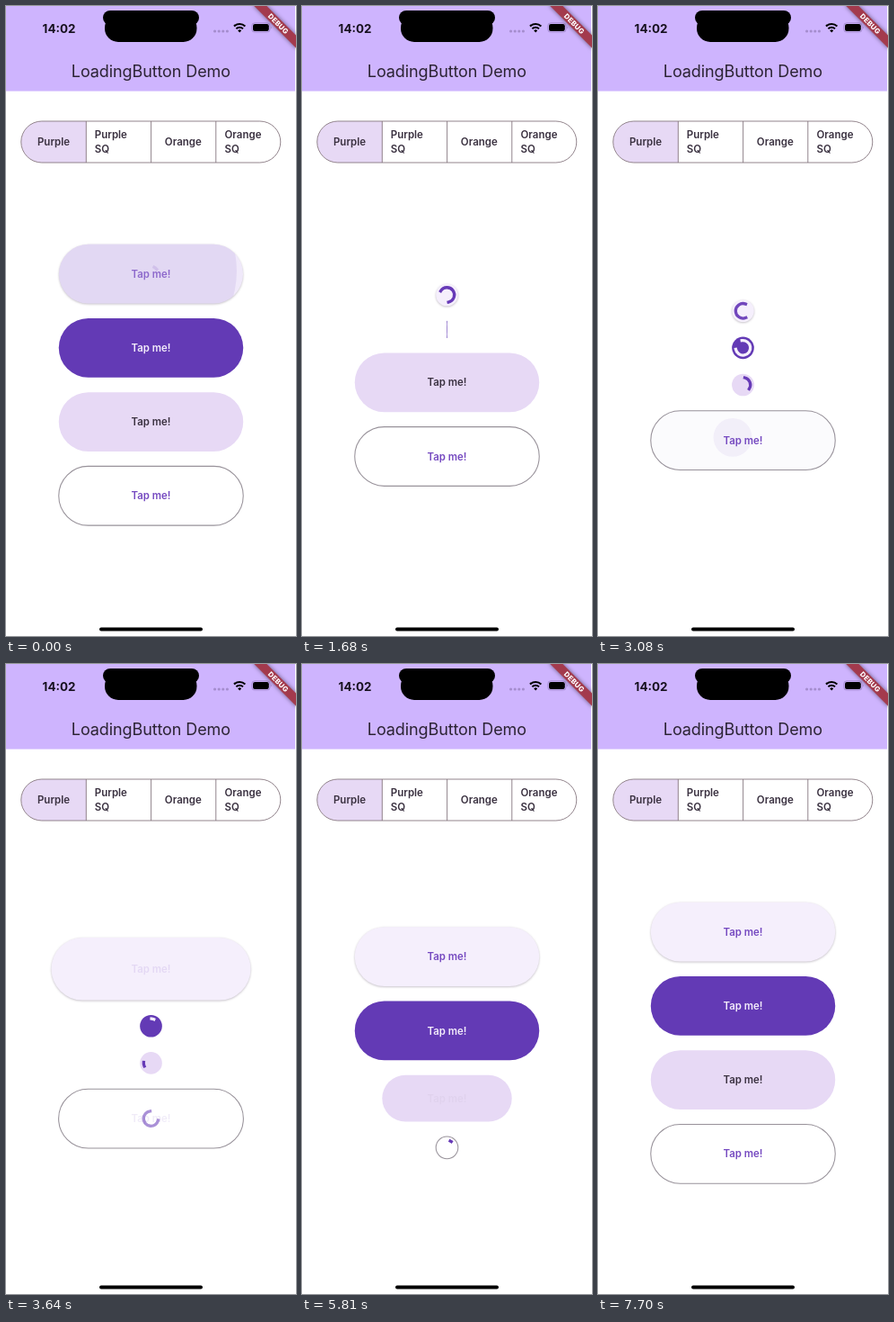
These frames come from a looping animation (323x700 px, 8000 ms). An HTML page:

```html
<!DOCTYPE html>
<html lang="en">
<head>
<meta charset="utf-8">
<title>LoadingButton Demo</title>
<style>
  html, body { margin: 0; width: 100%; height: 100%; overflow: hidden; background: #fff; }
  svg { display: block; width: 100vw; height: 100vh; font-family: Inter, Roboto, sans-serif; }
  .mid { text-anchor: middle; }
  .segments { font-size: 11.5px; font-weight: 600; fill: #3a3140; }
  .label { font-size: 13.9px; font-weight: 600; text-anchor: middle; }
  .line { fill: none; stroke: #86767f; stroke-width: .9; }
  .raised { filter: drop-shadow(0 1.5px 1px rgba(40, 20, 50, .28)); }
  .ribbon { filter: drop-shadow(0 0 2.5px rgba(0, 0, 0, .5)); }
</style>
</head>
<body>
<svg viewBox="0 0 323 700" preserveAspectRatio="none">
  <rect width="323" height="700" fill="#fff"/>
  <rect width="322" height="94.6" fill="#ceb4fe"/>
  <text class="mid" x="161.4" y="78.8" font-size="18" letter-spacing="-.1" fill="#2b2333">LoadingButton Demo</text>

  <g id="status">
    <text class="mid" x="59" y="29.5" font-size="13.4" font-weight="700" fill="#17111f">14:02</text>
    <rect x="110" y="9" width="102.5" height="31" rx="15"/>
    <rect x="108" y="5" width="107" height="16" rx="8"/>
    <g fill="#a58dce">
      <circle cx="232.6" cy="28" r="1.6"/><circle cx="237.2" cy="28" r="1.6"/>
      <circle cx="241.8" cy="28" r="1.6"/><circle cx="246.4" cy="28" r="1.6"/>
    </g>
    <g fill="none" stroke="#000" stroke-width="2">
      <path d="M254 22.5a8.8 8.8 0 0 1 12.4 0"/>
      <path d="M256.4 25.2a5.4 5.4 0 0 1 7.6 0"/>
    </g>
    <path d="M258.2 27.2a3 3 0 0 1 4 0l-2 2.2z"/>
    <rect x="273.7" y="18.8" width="20.4" height="10.4" rx="3.4" fill="none" stroke="#9f86c9" stroke-width=".8"/>
    <rect x="275" y="20" width="17.8" height="8" rx="2.3"/>
    <path d="M295 22.4q1.6 1.6 0 3.2z" fill="#9f86c9"/>
  </g>

  <g transform="translate(323 0) rotate(45)">
    <rect class="ribbon" x="-34" y="23" width="68" height="9.9" fill="#a33a4d"/>
    <text class="mid" y="30.8" font-size="7.8" font-weight="800" letter-spacing=".2" fill="#fff">DEBUG</text>
  </g>

  <g class="segments">
    <path d="M89.3 128H40a23 23 0 0 0 0 46h49.3z" fill="#e7d9f5"/>
    <rect class="line" x="16.8" y="128" width="289" height="46" rx="23"/>
    <path class="line" d="M89.3 128v46M161.6 128v46M233.8 128v46"/>
    <text class="mid" x="53" y="155.2">Purple</text>
    <text x="98.8" y="147">Purple</text><text x="98.8" y="163.4">SQ</text>
    <text class="mid" x="197.3" y="155.2">Orange</text>
    <text x="243.5" y="147">Orange</text><text x="243.5" y="163.4">SQ</text>
  </g>

  <g id="buttons" transform="translate(161.5 421) scale(.822)"></g>
  <rect x="104" y="690.4" width="115" height="4" rx="2"/>
</svg>

<script>
const LOOP = 8000, STEP = 70, LAST = 7700;
const TICK = 66.4;       // app time that passes in one displayed step
const MORPH = 1000, WORK = 3000, GAP = 20;
const FULL = { w: 250, h: 80 }, SMALL = { w: 30, h: 30 };
const PURPLE = '#673ab7';

const clamp = v => Math.max(0, Math.min(1, v));
const mix = (a, b, k) => a + (b - a) * k;

function make(tag, attrs, parent) {
  const node = document.createElementNS('http://www.w3.org/2000/svg', tag);
  set(node, attrs);
  parent.append(node);
  return node;
}

function set(node, attrs) {
  for (const key in attrs) node.setAttribute(key, attrs[key]);
}

function elasticInOut(t) {
  if (t <= 0) return 0;
  if (t >= 1) return 1;
  const u = 2 * t - 1;
  const wave = .5 * 2 ** (-10 * Math.abs(u)) * Math.sin((u - .1) * 5 * Math.PI);
  return u < 0 ? -wave : 1 + wave;
}

// cubic-bezier(.4, 0, .2, 1)
function fastOutSlowIn(x) {
  let lo = 0, hi = 1;
  for (let i = 0; i < 20; i++) {
    const s = (lo + hi) / 2, r = 1 - s;
    if (1.2 * r * r * s + .6 * r * s * s + s ** 3 < x) lo = s; else hi = s;
  }
  return lo * lo * (3 - 2 * lo);
}

// Indeterminate progress arc: head runs ahead, then tail catches up
function arcPath(ms) {
  const cycle = ms / 1333 % 1, span = 1.5 * Math.PI;
  const head = fastOutSlowIn(clamp(cycle * 2)) * span;
  const tail = fastOutSlowIn(clamp(cycle * 2 - 1)) * span;
  const from = -Math.PI / 2 + tail + ms / 2222 * 2 * Math.PI + cycle * Math.PI / 2;
  const sweep = Math.max(head - tail, .01);
  const point = a => `${(10 * Math.cos(a)).toFixed(3)} ${(10 * Math.sin(a)).toFixed(3)}`;
  return `M${point(from)}A10 10 0 ${sweep > Math.PI ? 1 : 0} 1 ${point(from + sweep)}`;
}

function createButton({ tap, fill, ink, text = ink, spin = PURPLE, stroke = 'none', raised }, index) {
  const root = make('g', {}, document.getElementById('buttons'));
  const clip = make('clipPath', { id: 'clip' + index }, root);
  const mask = make('rect', {}, clip);
  const body = make('rect', { fill, stroke, 'stroke-width': 1.3, class: raised ? 'raised' : '' }, root);
  const splash = make('g', { 'clip-path': `url(#clip${index})`, fill: ink }, root);
  make('rect', { x: -150, y: -60, width: 300, height: 120, opacity: .03 }, splash);
  const ripple = make('circle', { cx: -14, cy: -4, opacity: .1 }, splash);
  const label = make('text', { class: 'label', y: 5, fill: text }, root);
  label.textContent = 'Tap me!';
  const arc = make('path', {
    fill: 'none', stroke: spin, 'stroke-width': 4, 'stroke-linecap': 'square'
  }, root);

  return {
    size(now) {
      const ms = now - tap;
      const k = elasticInOut(ms / MORPH) - elasticInOut((ms - WORK) / MORPH);
      return { w: Math.max(0, mix(FULL.w, SMALL.w, k)), h: mix(FULL.h, SMALL.h, k) };
    },
    draw(now, { w, h }, y) {
      const ms = now - tap, closing = ms / MORPH, opening = (ms - WORK) / MORPH;
      const box = { x: -w / 2, y: -h / 2, width: w, height: h, rx: Math.min(w, h) / 2 };
      set(root, { transform: `translate(0 ${y + h / 2})` });
      set(mask, box);
      set(body, box);

      set(ripple, { r: 129 * Math.min(1.2, clamp((ms + 130) / 480) * 2) });
      set(splash, { opacity: clamp((ms + 130) / 75) * clamp((390 - ms) / 280) });

      const textAlpha = opening > 0 ? 2 * opening - 1 : 1 - 2 * closing;
      const spinAlpha = opening > 0 ? 1 - 2 * opening : closing / .8;
      set(label, { opacity: clamp(textAlpha) });
      set(arc, {
        d: arcPath(Math.max(0, ms)),
        opacity: clamp(spinAlpha),
        transform: `scale(${Math.min(1, w / SMALL.w)} ${Math.min(1, h / SMALL.h)})`
      });
    }
  };
}

const buttons = [
  { tap: -112, fill: '#f5effc', ink: PURPLE, text: '#7549c0', raised: true },
  { tap: 999, fill: '#633ab5', ink: '#fff', text: '#f3ecfb', spin: '#f5effc' },
  { tap: 1994, fill: '#e7d9f5', ink: '#3a3140' },
  { tap: 3003, fill: '#fff', ink: PURPLE, text: '#7549c0', stroke: '#98929a' }
].map(createButton);

function render(time) {
  const now = Math.floor(Math.min(time % LOOP, LAST) / STEP) * TICK;
  const sizes = buttons.map(b => b.size(now));
  const total = sizes.reduce((sum, s) => sum + s.h, GAP * (buttons.length - 1));
  let y = -total / 2;
  buttons.forEach((b, i) => {
    b.draw(now, sizes[i], y);
    y += sizes[i].h + GAP;
  });
}

const start = performance.now();
function tick() {
  render(performance.now() - start);
  requestAnimationFrame(tick);
}
tick();
</script>
</body>
</html>
```
